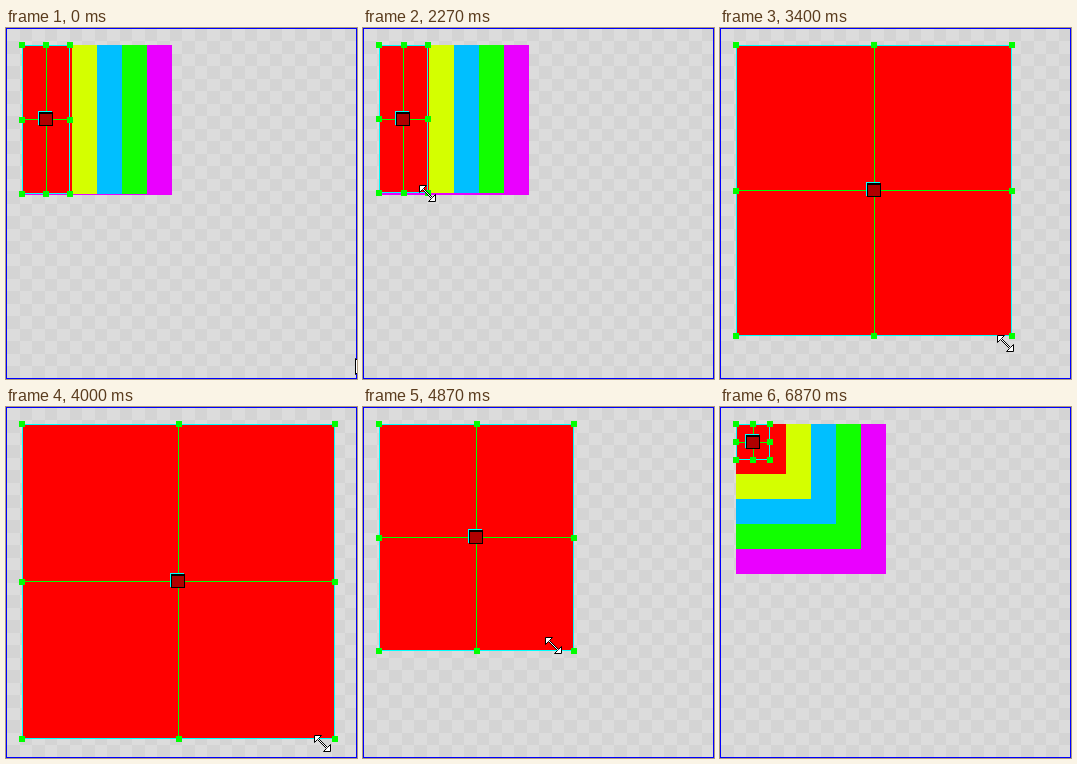
Recreate the animation shown at these times as an HTML page with a canvas. Size 351 by 351 pixels, loop 8000 ms.

```html
<!DOCTYPE html>
<html lang="en">
<head>
<meta charset="utf-8">
<title>Scaling a selected rectangle</title>
<style>
  html, body { margin: 0; width: 100%; height: 100%; overflow: hidden; background: #dcdcdc; }
  canvas { display: block; width: 351px; height: 351px; }
</style>
</head>
<body>
<canvas id="stage" width="351" height="351"></canvas>
<script>
const SIZE = 351, LOOP = 8000, FPS = 15;
const LEFT = 16, TOP = 17, BAND = 25;
const CYAN = '#00ffff', GREEN = '#00ff00';
const SWAP_STEP = 25, HIDE_STEP = 103;
const ctx = document.getElementById('stage').getContext('2d');

// Nested rectangles, back to front
const layerColors = ['#ea00ff', '#11ff00', '#00bfff', '#d4ff00', '#ff0000'];

// Turning points of the dragged corner and of the pointer: [step, x, y]
const cornerKeys = [
  [33, 64, 166], [34, 65, 165], [44, 234, 271], [60, 329, 332],
  [73, 211, 244], [83, 97, 135], [95, 50, 56], [103, 50, 53]
];
const pointerKeys = [
  [0, 349, 330], [13, 68, 98], [15, 56, 91], [24, 76, 164], [30, 64, 165],
  [34, 64, 165], [44, 235, 280], [60, 316, 336], [73, 190, 238], [83, 89, 130], [95, 49, 56]
];

const arrowShape = [[0, 0], [0, 16], [4, 12], [6, 17], [9, 16], [7, 11], [11, 11]];
const resizeHalf = [[-8, -1], [-8, -8], [-1, -8], [-4, -5], [5, 4]];
const resizeShape = [...resizeHalf, ...resizeHalf.map(([x, y]) => [-x, -y])];

// Smooth interpolation that never overshoots its keys
function valueAt(keys, step, axis) {
  let i = 0;
  while (i < keys.length - 2 && step >= keys[i + 1][0]) i++;
  const slope = k => k < 0 || k > keys.length - 2 ? 0 :
    (keys[k + 1][axis] - keys[k][axis]) / (keys[k + 1][0] - keys[k][0]);
  const tangent = k => {
    const a = slope(k - 1), b = slope(k);
    return a * b > 0 ? 2 * a * b / (a + b) : 0;
  };
  const span = keys[i + 1][0] - keys[i][0];
  const u = Math.max(0, Math.min(1, (step - keys[i][0]) / span));
  const ease = u * u * (3 - 2 * u);
  return keys[i][axis] + (keys[i + 1][axis] - keys[i][axis]) * ease +
    span * u * (1 - u) * ((1 - u) * tangent(i) - u * tangent(i + 1));
}

const pointAt = (keys, step) => [1, 2].map(axis => Math.round(valueAt(keys, step, axis)));

function box(color, x, y, w, h) {
  ctx.fillStyle = color;
  ctx.fillRect(x, y, w, h);
}

function frame(color, x, y, w, h) {
  ctx.strokeStyle = color;
  ctx.lineWidth = 1;
  ctx.strokeRect(x + 0.5, y + 0.5, w - 1, h - 1);
}

function drawBackground() {
  box('#dcdcdc', 0, 0, SIZE, SIZE);
  const edgeX = c => Math.round(1 + c * BAND / 2);
  const edgeY = r => Math.floor(1 + r * BAND / 2);
  for (let r = 0; r < 28; r++)
    for (let c = 1 - r % 2; c < 28; c += 2)
      box('#d4d4d4', edgeX(c), edgeY(r), edgeX(c + 1) - edgeX(c), edgeY(r + 1) - edgeY(r));
}

// Each layer grows only once the selection exceeds its own size
function drawLayers(width, height) {
  layerColors.forEach((color, i) => {
    const own = BAND * (6 - i);
    box(color, LEFT, TOP, Math.max(own, width), Math.max(own, height));
  });
}

function drawMarker(x, y) {
  const l = x - 7, t = y - 7;
  box(CYAN, l - 1, t - 1, 14, 14);
  box('#000000', l, t, 14, 14);
  box('#b00000', l + 1, t + 2, 12, 11);
}

function drawSelection(right, bottom) {
  const width = right - LEFT, height = bottom - TOP;
  const midX = (LEFT + right) / 2, midY = (TOP + bottom) / 2;
  const lineX = Math.floor(midX), lineY = Math.floor(midY);

  frame(CYAN, LEFT, TOP, width, height);
  box(GREEN, lineX, TOP, 1, height);
  box(GREEN, LEFT, lineY, width, 1);
  drawMarker(lineX, lineY);

  for (const x of [LEFT, midX, right])
    for (const y of [TOP, midY, bottom])
      if (x !== midX || y !== midY) box(GREEN, Math.round(x) - 3, Math.round(y) - 3, 6, 6);
}

function drawPointer(shape, [x, y]) {
  ctx.beginPath();
  for (const [dx, dy] of shape) ctx.lineTo(x + dx + 0.5, y + dy + 0.5);
  ctx.closePath();
  ctx.fillStyle = '#ffffff';
  ctx.fill();
  ctx.strokeStyle = '#000000';
  ctx.lineWidth = 1;
  ctx.stroke();
}

function draw(time) {
  // The small lead absorbs rounding at step boundaries
  const step = Math.floor((time + 4) % LOOP * FPS / 1000);
  const [right, bottom] = pointAt(cornerKeys, step);
  drawBackground();
  drawLayers(right - LEFT, bottom - TOP);
  drawSelection(right, bottom);
  frame('#0000ff', 0, 0, SIZE, SIZE);
  if (step < HIDE_STEP)
    drawPointer(step < SWAP_STEP ? arrowShape : resizeShape, pointAt(pointerKeys, step));
}

let begin;
function tick(now) {
  begin ??= now;
  draw(now - begin);
  requestAnimationFrame(tick);
}
draw(0);
requestAnimationFrame(tick);
</script>
</body>
</html>
```
